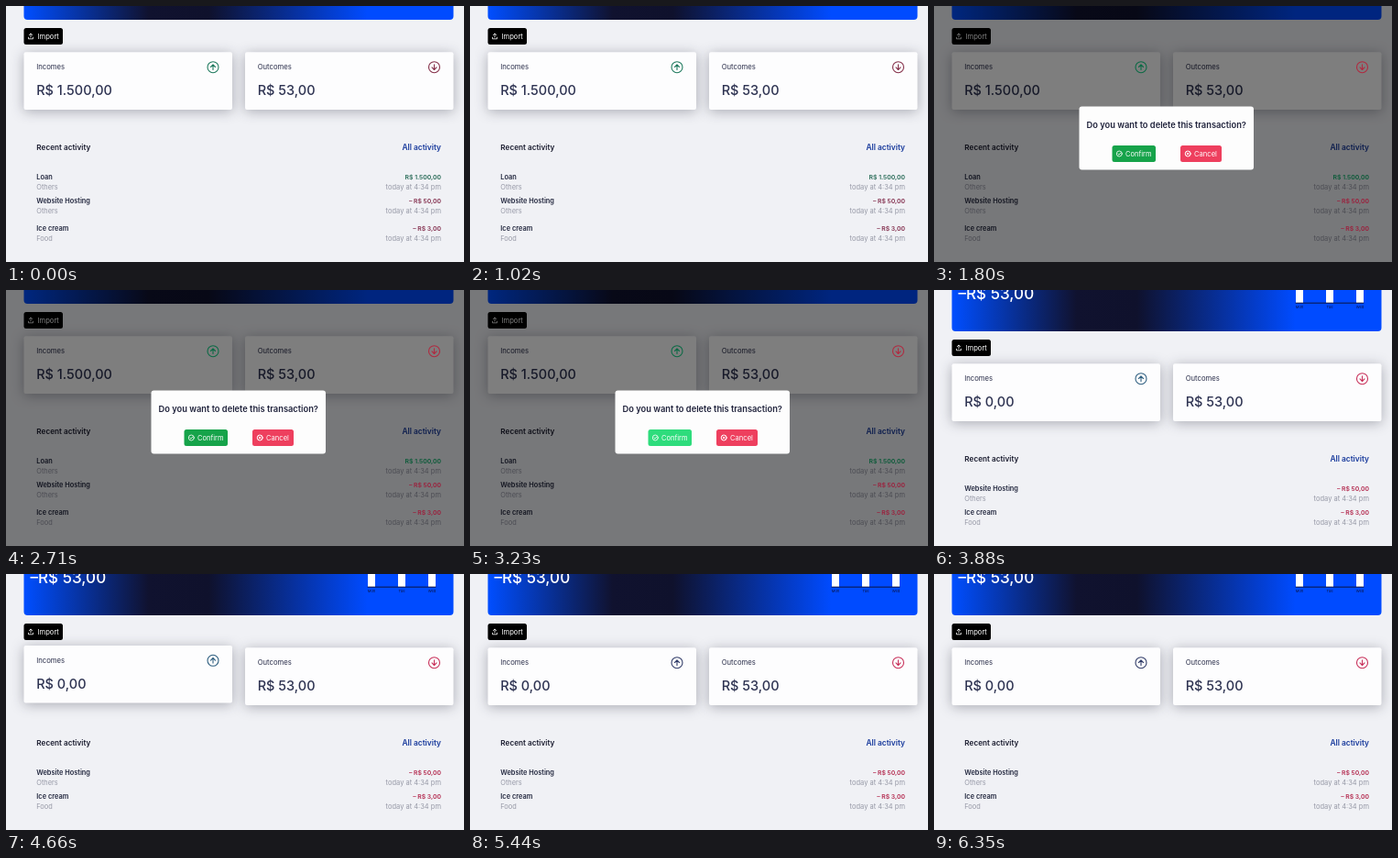
An HTML page that plays this animation: 500x279 px, repeating every 8 s.

```html
<!DOCTYPE html>
<html lang="en">
<head>
<meta charset="utf-8">
<style>
  html, body { margin: 0; width: 100%; height: 100%; overflow: hidden; background: #f0f1f5; }
  svg { display: block; width: 500px; height: 279px; }
  text { font-family: Inter, "Open Sans", sans-serif; }
  .card { filter: drop-shadow(0 2px 7px rgba(20, 22, 40, .32)); }
  .line { fill: none; stroke-linecap: round; stroke-linejoin: round; }
</style>
</head>
<body>
<svg id="stage" viewBox="0 0 500 279"></svg>
<script>
const LOOP = 8000, OPEN = 1800, HOVER = 2710, CLOSE = 3490, REMOVED = 3880;
const stage = document.getElementById('stage');

const clamp = v => Math.max(0, Math.min(1, v));
const ease = (t, from, to) => { const p = clamp((t - from) / (to - from)); return p * p * (3 - 2 * p); };
const mix = (a, b, p) => `rgb(${a.map((v, i) => Math.round(v + (b[i] - v) * p))})`;

const rect = (x, y, w, h, r, fill, extra = '') =>
  `<rect x="${x}" y="${y}" width="${w}" height="${h}" rx="${r}" fill="${fill}" ${extra}/>`;
const text = (x, y, size, weight, fill, str, anchor = 'start') =>
  `<text x="${x}" y="${y}" font-size="${size}" font-weight="${weight}" fill="${fill}" text-anchor="${anchor}">${str}</text>`;
const line = (d, color, width) =>
  `<path class="line" d="${d}" stroke="${color}" stroke-width="${width}"/>`;
const ring = (x, y, r, color, width) =>
  `<circle class="line" cx="${x}" cy="${y}" r="${r}" stroke="${color}" stroke-width="${width}"/>`;
const move = (y, body) => `<g transform="translate(0 ${y.toFixed(2)})">${body}</g>`;

const defs = `<defs><linearGradient id="blue" gradientUnits="userSpaceOnUse" x1="20" x2="488">
  <stop offset="0" stop-color="#004eff"/><stop offset=".29" stop-color="#10122f"/>
  <stop offset=".43" stop-color="#0f112c"/><stop offset=".8" stop-color="#004bff"/>
  <stop offset="1" stop-color="#004bff"/></linearGradient></defs>`;

function banner() {
  const days = ['Mon', 'Tue', 'Wed'].map((day, i) =>
    rect(395 + 33 * i, -70, 8, 54, 0, '#fff') +
    text(399 + 33 * i, -10.5, 4, 400, '#0b1440', day, 'middle')).join('');
  return rect(19.5, -100, 469, 115, 4, 'url(#blue)') +
    text(26.5, -20, 17.1, 500, '#fff', '–R$ 53,00') +
    days + line('M395 -15.8H469', '#0b1440', 1);
}

const importButton = rect(19.5, 24, 42.5, 18, 2.5, '#000') +
  line('M27 34V30.2M25.4 31.6L27 30L28.6 31.6M24.5 34.2V35.8H29.5V34.2', '#fff', .8) +
  text(34.5, 35.6, 7.6, 400, '#fff', 'Import');

const card = (x, label, value) =>
  rect(x, 50.3, 227.5, 62.7, 2, '#fdfdfe', 'class="card"') +
  text(x + 13.7, 69.2, 7.7, 400, '#2a2e4a', label) +
  text(x + 13.7, 97, 14.5, 500, '#2e3352', value);

const arrow = (x, dir, color) => ring(x, 66.7, 6, color, 1.1) +
  line(`M${x} ${66.7 - 2.8 * dir}V${66.7 + 2.8 * dir}M${x - 2.5} ${66.7 + .2 * dir}L${x} ${66.7 + 2.8 * dir}L${x + 2.5} ${66.7 + .2 * dir}`, color, 1.1);

function rows(removed) {
  const web = ['Website Hosting', 'Others', '– R$ 50,00'];
  const ice = ['Ice cream', 'Food', '– R$ 3,00'];
  return removed
    ? [[186, ...web], [212, ...ice]]
    : [[186, 'Loan', 'Others', 'R$ 1.500,00'], [212, ...web], [242, ...ice]];
}

function dialog(hover) {
  const green = mix([22, 163, 74], [46, 220, 124], hover);
  return rect(158.5, 109.5, 190.5, 69, 3, '#fdfdfd') +
    text(253.7, 133, 9.3, 600, '#20233c', 'Do you want to delete this transaction?', 'middle') +
    rect(194.5, 152, 47.5, 18, 2.5, green) +
    ring(202.3, 161, 3, '#fff', .8) + line('M200.9 161.1L202 162.2L203.9 159.9', '#fff', .8) +
    text(209, 163.7, 7.5, 400, '#fff', 'Confirm') +
    rect(269, 152, 45, 18, 2.5, '#ee3f5e') +
    ring(277.2, 161, 3, '#fff', 1) + line('M276.1 159.9L278.3 162.1M278.3 159.9L276.1 162.1', '#fff', 1) +
    text(284, 163.7, 7.6, 400, '#fff', 'Cancel');
}

function draw(t) {
  const open = t >= OPEN && t < CLOSE;
  const removed = t >= REMOVED;
  const shift = removed ? 30 : 0;
  const lift = -2.4 * (ease(t, 4270, 4660) - ease(t, 5180, 5440));
  const up = open ? '#0c6a45' : !removed ? '#1f7a5e' : t < 5180 ? '#2f5f80' : '#303b68';
  const down = open ? '#b02a40' : removed ? '#c8305a' : '#85304a';
  const gain = open ? '#0a5a38' : '#286b57';
  const loss = open ? '#9c1f3c' : removed ? '#b42c50' : '#84304f';
  const list = rows(removed);

  const page = banner() + importButton +
    move(lift, card(19.5, 'Incomes', removed ? 'R$ 0,00' : 'R$ 1.500,00')) +
    card(261, 'Outcomes', 'R$ 53,00') +
    text(33.3, 157.2, 8.2, 600, '#1b1d30', 'Recent activity') +
    text(475, 157.2, 8.4, 600, '#183a9c', 'All activity', 'end') +
    list.map(([y, name, kind]) =>
      text(33.3, y + 2.5, 7.4, 600, '#23283f', name) +
      text(33.3, y + 13.5, 7.4, 400, '#9698a6', kind) +
      text(475, y + 13.5, 7.5, 400, '#9698a6', 'today at 4:34 pm', 'end')).join('');

  // Coloured marks stay vivid above the dimming layer.
  const marks = move(lift, arrow(226, -1, up)) + arrow(467.5, 1, down) +
    list.map(([y, , , sum]) =>
      text(475, y + 2.5, 6.8, 600, sum[0] === '–' ? loss : gain, sum, 'end')).join('');

  return defs + rect(0, 0, 500, 279, 0, '#f0f1f5') + move(shift, page) +
    (open ? rect(0, 0, 500, 279, 0, '#000', 'opacity=".5"') : '') +
    move(shift, marks) +
    (open ? dialog(ease(t, HOVER, HOVER + 260)) : '');
}

let last = '';
function tick() {
  const next = draw(performance.now() % LOOP);
  if (next !== last) stage.innerHTML = last = next;
  requestAnimationFrame(tick);
}
tick();
</script>
</body>
</html>
```
